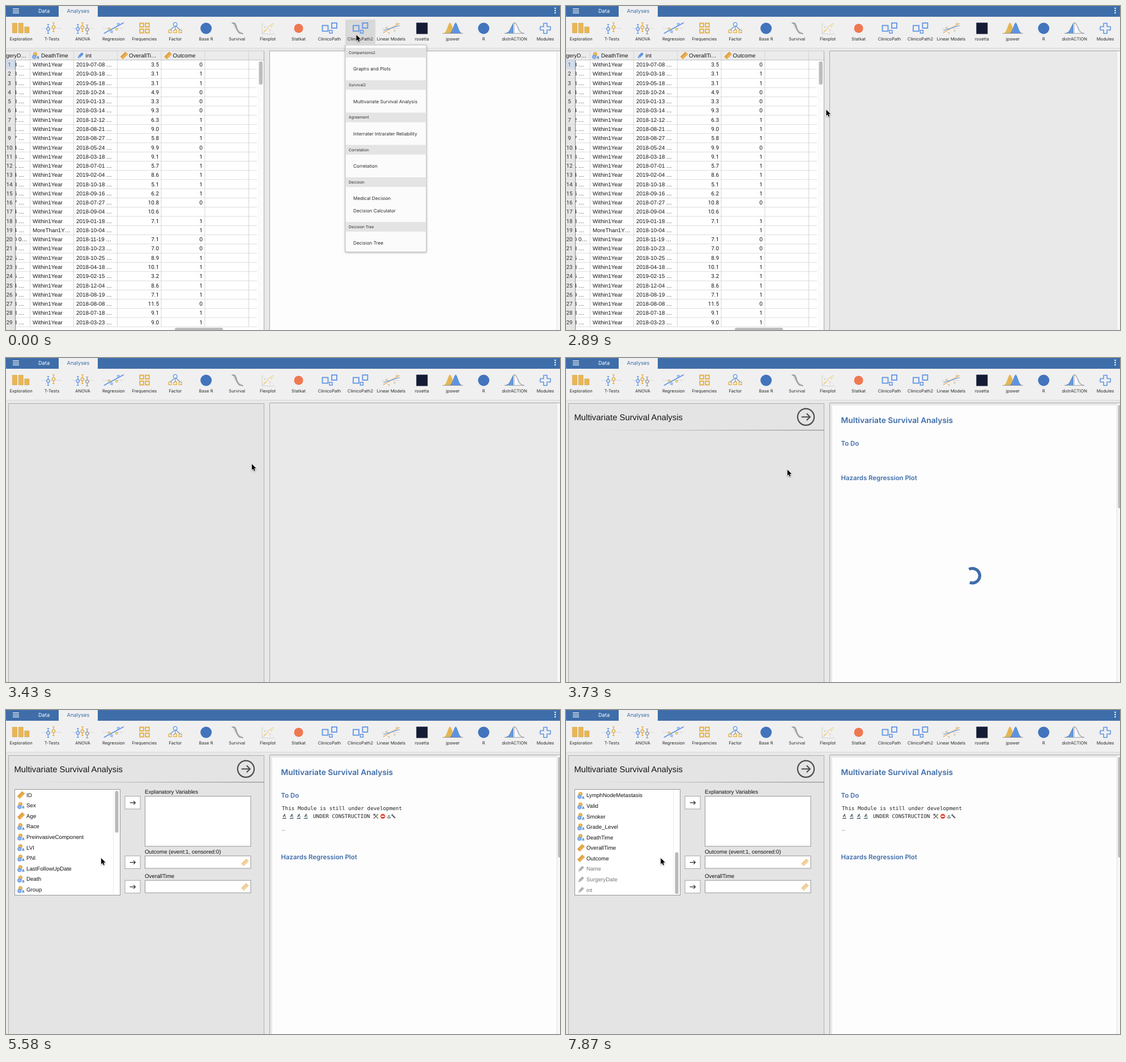
Write an HTML page with a canvas that moves like this. It is 978 by 573 pixels and loops after 8 s.

```html
<!DOCTYPE html>
<html lang="en">
<head>
<meta charset="utf-8">
<title>Multivariate Survival Analysis</title>
<style>
html, body { margin: 0; width: 100%; height: 100%; overflow: hidden; background: #e9e9e9; }
canvas { display: block; }
</style>
</head>
<body>
<canvas id="stage" width="978" height="573"></canvas>
<script>
const LOOP = 8000;
const ctx = document.getElementById('stage').getContext('2d');
ctx.textRendering = 'geometricPrecision';
const UI = 'Inter, sans-serif', SANS = '"Liberation Sans", Arial, sans-serif';
const DIGITS = 'Roboto, sans-serif', MONO = '"DejaVu Sans Mono", monospace';
const BLUE = '#3e6da9', SKY = '#5f94e6', GOLD = '#e6ac40', GREY = '#9a9a9a';

// Drawing helpers
function rect(x, y, w, h, fill, stroke, width = 1) {
  if (fill) { ctx.fillStyle = fill; ctx.fillRect(x, y, w, h); }
  if (stroke) { ctx.strokeStyle = stroke; ctx.lineWidth = width; ctx.strokeRect(x, y, w, h); }
}
function pill(x, y, w, h, r, fill) {
  ctx.fillStyle = fill;
  ctx.beginPath(); ctx.roundRect(x, y, w, h, r); ctx.fill();
}
function line(points, color, width = 1, dash = []) {
  ctx.strokeStyle = color; ctx.lineWidth = width; ctx.setLineDash(dash);
  ctx.beginPath();
  points.forEach(([x, y]) => ctx.lineTo(x, y));
  ctx.stroke(); ctx.setLineDash([]);
}
function poly(points, fill) {
  ctx.fillStyle = fill; ctx.beginPath();
  points.forEach(([x, y]) => ctx.lineTo(x, y));
  ctx.closePath(); ctx.fill();
}
function disc(x, y, r, fill, stroke, width = 1) {
  ctx.beginPath(); ctx.arc(x, y, r, 0, 7);
  if (fill) { ctx.fillStyle = fill; ctx.fill(); }
  if (stroke) { ctx.strokeStyle = stroke; ctx.lineWidth = width; ctx.stroke(); }
}
function text(str, x, midY, size, { font = SANS, color = '#151515', align = 'left', weight = 400 } = {}) {
  ctx.font = `${weight} ${size}px ${font}`;
  ctx.fillStyle = color; ctx.textAlign = align;
  ctx.fillText(str, x, midY + size * 0.35);
}
function clipped(x, y, w, h, draw) {
  ctx.save(); ctx.beginPath(); ctx.rect(x, y, w, h); ctx.clip();
  draw(); ctx.restore();
}
function turned(x, y, angle, draw) {
  ctx.save(); ctx.translate(x, y); ctx.rotate(angle); draw(); ctx.restore();
}
const at = (steps, t) => steps.findLast(s => s[0] <= t);

// Variable type icons
const typeIcon = {
  nominal(x, y) {
    disc(x + 0.5, y - 2.3, 3.2, '#f0bb55', '#cf932b', 0.9);
    disc(x - 1.2, y + 2.5, 3.2, '#8db7f2', '#4f86d8', 0.9);
    text('a', x + 2.9, y + 2.8, 8, { color: '#3f75c8', weight: 700 });
  },
  ruler(x, y) {
    turned(x, y, -Math.PI / 4, () => {
      rect(-6, -2.8, 12, 5.6, '#eeb04a', '#d4922d', 0.8);
      for (let i = -4; i <= 4; i += 2) line([[i, -2.8], [i, -0.6]], '#a86f16', 0.7);
    });
  },
  pencil(x, y, color = SKY) {
    turned(x, y, -Math.PI / 4, () => {
      pill(-3.4, -2.2, 9, 4.4, 1.2, color);
      poly([[-3.9, -2.2], [-6.5, 0], [-3.9, 2.2]], color);
    });
  },
  faded(x, y) { typeIcon.pencil(x, y, '#b0b0b0'); }
};

// Toolbar icons, drawn around (0, 0)
function whisker(x, y, color) {
  line([[x, y - 8], [x, y + 8]], color, 1.4);
  line([[x - 2, y - 8], [x + 2, y - 8]], color);
  line([[x - 2, y + 8], [x + 2, y + 8]], color);
  disc(x, y, 2.6, '#f0f0f0', color, 1.4);
}
const dotted = halfWidth => line([[-halfWidth, 0], [halfWidth, 0]], '#a8a8a8', 1, [1, 2]);
const box = (x, y, s, color, width = 1.8) => rect(x, y, s, s, null, color, width);
function bell(cx, halfWidth, height, base, from = -1, to = 1) {
  const points = [];
  for (let i = 0; i <= 30; i++) {
    const u = from + (to - from) * i / 30;
    points.push([cx + u * halfWidth, base - height * Math.exp(-5 * u * u)]);
  }
  return points;
}
const shade = (points, base, fill) => poly([[points[0][0], base], ...points, [points.at(-1)[0], base]], fill);
const emblem = color => () => disc(0, 0, 10, color);
function squares() {
  box(-12.5, -5, 10, SKY);
  box(4, -9.5, 9, SKY);
  box(0, 3.5, 5, SKY, 1.5);
}
const tools = [
  ['Exploration', () => [[-15, -9], [-4.2, -9], [6.5, -2.5]].forEach(([x, y]) => rect(x, y, 7.8, 8 - y, '#ebb652', '#d8a445', 0.8))],
  ['T-Tests', () => { dotted(17); whisker(-6.5, 1, SKY); whisker(3, -2, GOLD); }],
  ['ANOVA', () => { dotted(17); whisker(-8.5, 1, SKY); whisker(-0.5, -2, GOLD); whisker(8, 2, GREY); }],
  ['Regression', () => {
    dotted(18); line([[-17, 9], [18, -10]], SKY, 1.5);
    box(-9.5, -0.5, 3, GOLD, 1); box(-5, 4.5, 3, SKY, 1); box(4, 0, 3, GOLD, 1); box(7, -9, 3, SKY, 1);
  }],
  ['Frequencies', () => [-8, 2].forEach(x => [-9, 1.5].forEach(y => box(x, y, 6.5, GOLD, 1.9)))],
  ['Factor', () => {
    [-9, 0, 9].forEach(x => { line([[0, -5], [x, 3]], SKY, 1.2); box(x - 2.4, 3, 4.8, GOLD, 1.3); });
    disc(0, -7, 3.3, '#f0f0f0', SKY, 1.3);
  }],
  ['Base R', emblem('#4274bd')],
  ['Survival', () => {
    poly([[-8, -9], [-1, -9], [2, 2], [10, 9], [4, 9], [-2, 2]], '#cfcfcf');
    line([[-9, -9.5], [-4, -9], [-2, -4], [1, 4], [4, 8], [11, 9.5]], '#808a94', 1.4);
  }],
  ['Flexplot', () => {
    line([[-10, -10], [-10, 10], [12, 10]], '#d2d2d2');
    line([[-9, 8], [-3, 4], [1, -3], [11, -9]], '#f0cf91', 1.4);
    line([[-8, -7], [11, 8]], '#d0c8dc', 1, [1, 2]);
    [[-5, -2], [-6, 4], [4, 3], [7, -3]].forEach(([x, y]) => disc(x, y, 1, '#ebbc6d'));
  }],
  ['Statkat', () => disc(0, 0, 8, '#f07850')],
  ['ClinicoPath', squares],
  ['ClinicoPath2', squares],
  ['Linear Models', () => {
    dotted(16);
    line([[-14, 8], [15, -9]], GOLD, 1.4); line([[-14, 4], [15, -5]], SKY, 1.3);
    [[-9, -2], [-5, 7], [5, 3], [9, -9]].forEach(([x, y]) => box(x, y, 2, '#c5b68d', 0.8));
  }],
  ['rosetta', () => rect(-10, -10, 20, 20, '#141c35')],
  ['jpower', () => {
    shade(bell(-5, 13, 19, 9), 9, '#e6b552');
    shade(bell(5, 13, 19, 9), 9, '#5e92df');
    line([[-18, 9], [18, 9]], '#8f8f8f', 0.8);
  }],
  ['R', emblem('#4274bd')],
  ['distrACTION', () => {
    shade(bell(0, 17, 19, 9, -0.45, 0.25), 9, '#ffffff');
    shade(bell(0, 17, 19, 9, -1, -0.1), 9, '#6499e5');
    line(bell(0, 17, 19, 9), '#66788f', 1);
    line([[0, -10], [0, 9]], '#8796aa', 0.8);
    line([[-18, 9], [18, 9]], '#999', 0.8);
  }],
  ['Modules', () => {
    const a = 3, b = 9;
    line([[-a, -b], [a, -b], [a, -a], [b, -a], [b, a], [a, a], [a, b], [-a, b], [-a, a], [-b, a], [-b, -a], [-a, -a], [-a, -b], [a, -b]], SKY, 1.6);
  }]
];

function drawTopBar(buttonColor) {
  rect(0, 0, 978, 573, '#e9e9e9');
  rect(0, 0, 978, 19, BLUE);
  rect(0, 19, 978, 55, '#f0f0f0');
  rect(93, 0, 69, 20, '#f0f0f0');
  rect(0, 74, 978, 1, '#d8d8d8');
  [4.5, 8, 11.5].forEach(y => rect(12, y, 11, 1.3, '#fff'));
  [4, 8, 12].forEach(y => disc(969.5, y, 1.3, '#fff'));
  text('Data', 67, 8.5, 9.3, { font: UI, color: '#fff', align: 'center' });
  text('Analyses', 127.5, 8.5, 9.3, { font: UI, color: BLUE, align: 'center' });
  if (buttonColor) rect(599, 24, 53, 43, buttonColor);
  tools.forEach(([label, icon], i) => {
    const x = 26.5 + 54.45 * i;
    turned(x, 39.5, 0, icon);
    text(label, x, 58.5, 7.6, { font: UI, color: '#2a2a2a', align: 'center' });
  });
}

// Spreadsheet
const dates = ('19-07-08 19-03-18 19-05-18 18-10-24 19-01-13 18-03-14 18-12-12 18-08-21 18-08-27 18-05-24 ' +
  '18-03-18 18-07-01 19-02-04 18-10-18 18-09-16 18-07-27 18-09-04 19-01-18 18-10-04 18-11-19 ' +
  '18-10-23 18-10-25 18-04-18 19-02-15 18-12-04 18-08-19 18-08-08 18-07-18 18-03-23').split(' ');
const times = ('3.5 3.1 3.1 4.9 3.3 9.3 6.3 9.0 5.8 9.9 9.1 5.7 8.6 5.1 6.2 10.8 10.6 7.1 - 7.1 ' +
  '7.0 8.9 10.1 3.2 8.6 7.1 11.5 9.1 9.0').split(' ');
const outcomes = '0110001110111110-110011111011';
const surgeryEnds = '33343421743143674340353549333';

function drawSheet() {
  const pitch = 16.27, top = 95.5, size = 9.85;
  const columns = [42.5, 119.5, 196.5, 274, 351, 428.5];
  const number = { font: DIGITS, align: 'right' };
  rect(0, 80, 455, 493, '#fff');
  rect(0, 80, 455, 15, '#ebebeb');
  rect(0, 95, 16.5, 478, '#e6e6e6');
  rect(0, 96, 16, 15.5, '#d3dbe8');
  for (let i = 0; i <= 29; i++) line([[0, top + i * pitch], [443, top + i * pitch]], '#dcdcdc');
  columns.forEach(x => line([[x, 80], [x, 567]], '#d6d6d6'));
  line([[0, 95.5], [455, 95.5]], '#c2c2c2');
  line([[0, 79.5], [456, 79.5]], '#d0d0d0');

  text('geryD…', 0, 87.5, size);
  typeIcon.nominal(51, 87.5); text('DeathTime', 62, 87.5, size);
  typeIcon.pencil(131.5, 87.5); text('int', 140.5, 87.5, size);
  typeIcon.ruler(208.5, 87.5); text('OverallTi…', 217, 87.5, size);
  typeIcon.ruler(286, 87.5); text('Outcome', 294.5, 87.5, size);

  dates.forEach((date, i) => {
    const y = top + (i + 0.5) * pitch;
    text(i + 1, 6, y, size, { font: DIGITS, align: 'center', color: i ? '#333' : BLUE });
    clipped(17, y - 8, 25, 16, () => text(i === 19 ? '0 0…' : surgeryEnds[i] + ' …', 13.8, y, size));
    text(i === 18 ? 'MoreThan1Y…' : 'Within1Year', 47, y, size);
    text(`20${date} …`, 124, y, size);
    if (times[i] !== '-') text(times[i], 270, y, size, number);
    if (outcomes[i] !== '-') text(outcomes[i], 347, y, size, number);
  });
  line([[16.5, 96], [16.5, 573]], '#8c8c8c');
  line([[16.5, 96], [16.5, 111]], '#4c7fc4');
  rect(443.5, 96, 11.5, 477, '#fbfbfb');
  pill(446.5, 98, 6.5, 41, 3, '#bcbcbc');
  pill(298, 569, 85, 8, 3, '#bcbcbc');
  line([[455.5, 80], [455.5, 573]], '#a8a8a8');
}

// Drop-down menu: [label, middle y, is heading]
const menu = [
  ['Comparisons2', 82.5, 1], ['Graphs and Plots', 111.5], ['Survival2', 139.8, 1],
  ['Multivariate Survival Analysis', 168.8], ['Agreement', 197, 1], ['Interrater Intrarater Reliability', 226],
  ['Correlation', 254.2, 1], ['Correlation', 283], ['Decision', 311.5, 1], ['Medical Decision', 340.3],
  ['Decision Calculator', 362], ['Decision Tree', 390.5, 1], ['Decision Tree', 419.3]
];
function drawMenu(hover) {
  ctx.save();
  ctx.shadowColor = 'rgba(0,0,0,.35)'; ctx.shadowBlur = 4; ctx.shadowOffsetY = 1;
  rect(599, 69, 143, 366, '#fbfbfb');
  ctx.restore();
  rect(599, 69, 143, 366, null, '#bdbdbd');
  if (hover) rect(600, 158, 141, 21.5, '#f3f3f3');
  menu.forEach(([label, y, heading]) => {
    if (heading) rect(599.5, y - 8.5, 142, 17, '#e4e4e4');
    text(label, heading ? 605 : 613, y, heading ? 6.85 : 8.2, { font: UI, color: '#2a2a2a' });
  });
}

// Options panel
const variables = [
  'ID ruler', 'Sex', 'Age ruler', 'Race', 'PreinvasiveComponent', 'LVI', 'PNI', 'LastFollowUpDate', 'Death', 'Group',
  'Grade', 'TStage', 'Anti-X-intensity ruler', 'Anti-Y-intensity ruler', 'LymphNodeMetastasis', 'Valid', 'Smoker',
  'Grade_Level', 'DeathTime', 'OverallTime ruler', 'Outcome ruler', 'Name faded', 'SurgeryDate faded', 'int faded'
].map(entry => entry.split(' '));

function arrow(x, y, half, head, color, width) {
  line([[x - half, y], [x + half, y]], color, width);
  line([[x + half - head, y - head], [x + half, y], [x + half - head, y + head]], color, width);
}
function drawVariables(scroll) {
  const pitch = 18.58;
  clipped(16, 141, 184, 186, () => variables.forEach(([name, type = 'nominal'], i) => {
    const y = 150.3 + i * pitch - scroll;
    if (y < 130 || y > 340) return;
    typeIcon[type](type === 'nominal' ? 25 : 26.5, y);
    text(name, 36, y, 9.78, { color: type === 'faded' ? '#777' : '#111' });
  }));
  line([[189.5, 141], [189.5, 327]], '#ececec');
  pill(192.5, 143 + scroll * 108.5 / 259.5, 6, 74, 3, '#b9b9b9');
}
function drawOptions(t, scroll) {
  rect(4.5, 80.5, 451, 500, '#e4e4e4', '#adadad');
  if (t < 3730) return;
  text('Multivariate Survival Analysis', 14.5, 104.5, 14.85);
  disc(423.5, 104.3, 14.6, null, '#4a4a4a', 2.2);
  arrow(423.3, 104.3, 7.5, 6, '#4a4a4a', 2);
  const fade = ctx.createLinearGradient(50, 0, 456, 0);
  fade.addColorStop(0, 'rgba(140,140,140,0)'); fade.addColorStop(1, '#8c8c8c');
  rect(50, 127, 405, 1.2, fade);
  if (t < 4240) return;
  rect(15.5, 140.5, 186, 187, '#fff', '#969696');
  [['Explanatory Variables', 145, 152.5, 88.5], ['Outcome (event:1, censored:0)', 250.5, 258, 22], ['OverallTime', 293.8, 301.3, 22]]
    .forEach(([label, labelY, y, h]) => {
      text(label, 245, labelY, 9.75, { color: '#111' });
      rect(245.5, y, 186.5, h, '#fff', '#969696');
      rect(210, y, 27, 22.5, '#fff', '#a5a5a5');
      arrow(223.5, y + 11.5, 4.8, 3.2, '#222', 1.2);
      if (h > 30) return;
      ctx.globalAlpha = 0.5;
      typeIcon.ruler(422, y + 11.5);
      ctx.globalAlpha = 1;
    });
  if (t >= 4490) drawVariables(scroll);
}

// Results
function microscope(x, y) {
  line([[x + 1, y + 3.7], [x + 7.5, y + 3.7]], '#536775', 1.4);
  line([[x + 2.5, y + 1], [x + 5.5, y - 4]], '#52616c', 2);
  line([[x + 5.5, y - 2], [x + 6.8, y + 0.5], [x + 5, y + 3]], '#7d929f', 1.1);
}
function drawSigns(y) {
  [487, 500, 512.5, 525].forEach(x => microscope(x, y));
  line([[649, y - 4], [657, y + 4]], '#6f7b83', 1.5);
  line([[649, y + 4], [657, y - 4]], '#7e6b5b', 1.5);
  line([[648.5, y - 2], [652, y - 4]], '#59646b', 2);
  disc(665.2, y, 4.3, '#e2452f');
  rect(662.4, y - 1, 5.6, 2, '#fff');
  line([[676, y - 2], [673.5, y + 3], [678.5, y + 3], [676, y - 2]], '#444', 0.9);
  line([[681, y - 3], [687, y + 3]], '#5d6266', 2.2);
  line([[680.3, y - 1.5], [683, y - 4]], '#85898c', 1.6);
}
const spinnerTurns = [[0, 0], [3990, 94], [4490, 265]];
function drawResults(t) {
  const blank = t < 1910, loaded = t >= 4740;
  rect(466, 80, 507, 493, blank ? '#fdfdfd' : '#e9e9e9');
  rect(973, 80, 5, 493, '#f8f8f8');
  line([[972.5, 81], [972.5, 573]], '#e0e0e0');
  line([[978, 79.5], [465.5, 79.5], [465.5, 573]], '#a9a9a9');
  if (t < 3730) return;
  rect(470, 84, 502, 489, '#fdfdfd');
  pill(974.5, 83, 6, loaded ? 178 : 183, 3, '#bdbdbd');
  const heading = (str, y, size) => text(str, 485.5, y, size, { font: UI, color: BLUE, weight: 600 });
  heading('Multivariate Survival Analysis', 110, 13.8);
  heading('To Do', 151.3, 11.4);
  heading('Hazards Regression Plot', loaded ? 260.3 : 212.3, 11.4);
  if (loaded) {
    const mono = { font: MONO, color: '#222' };
    text('This Module is still under development', 487, 174, 9.27, mono);
    drawSigns(188);
    text('UNDER CONSTRUCTION', 542, 188, 9.27, mono);
    text('_', 487, 207.5, 9.27, mono);
  } else {
    const turn = at(spinnerTurns, t)[1];
    const rad = degrees => (degrees + turn) * Math.PI / 180;
    ctx.strokeStyle = BLUE; ctx.lineWidth = 5.2;
    ctx.beginPath(); ctx.arc(717.5, 385, 12.9, rad(-118), rad(111)); ctx.stroke();
  }
}

// Pointer: [time, x, y]
const pointerPath = [
  [0, 618.5, 51], [210, 618.5, 59], [390, 621.5, 86], [570, 631, 143], [790, 630.5, 166], [1130, 629.5, 168],
  [2120, 588, 170.5], [2470, 533.5, 171.5], [2890, 459.5, 183.5], [3160, 446, 186], [3430, 434, 187.5],
  [3730, 390.8, 197.5], [3990, 346, 203], [4240, 346, 207], [4490, 346, 210.5], [5400, 290.5, 222],
  [5580, 168, 262], [7870, 167.3, 262]
];
function drawPointer(t) {
  const [, x, y] = at(pointerPath, t);
  if (t >= 1670 && t < 1910) disc(630.3, 168, 8.6, null, '#222', 1.1);
  ctx.save();
  ctx.translate(x, y);
  ctx.shadowColor = 'rgba(0,0,0,.35)'; ctx.shadowBlur = 2; ctx.shadowOffsetY = 1;
  const shape = [[0, 0], [0, 10.6], [2.4, 8.4], [4, 12.3], [5.8, 11.5], [4.2, 7.8], [7.6, 7.6]];
  line([...shape, [0, 0]], '#fff', 1.5);
  ctx.shadowColor = 'transparent';
  poly(shape, '#000');
  ctx.restore();
}

const scrollSteps = [[0, 0], [6720, 42], [6960, 140], [7160, 225], [7400, 259.5]];

function draw(t) {
  const menuOpen = t < 1910;
  drawTopBar(menuOpen && (t < 1670 ? '#d9d9d9' : '#c5c5c5'));
  drawResults(t);
  if (t < 3160) drawSheet();
  else if (t >= 3430) drawOptions(t, at(scrollSteps, t)[1]);
  if (menuOpen) drawMenu(t >= 1130);
  drawPointer(t);
}
function frame() {
  draw(performance.now() % LOOP);
  requestAnimationFrame(frame);
}
frame();
</script>
</body>
</html>
```
